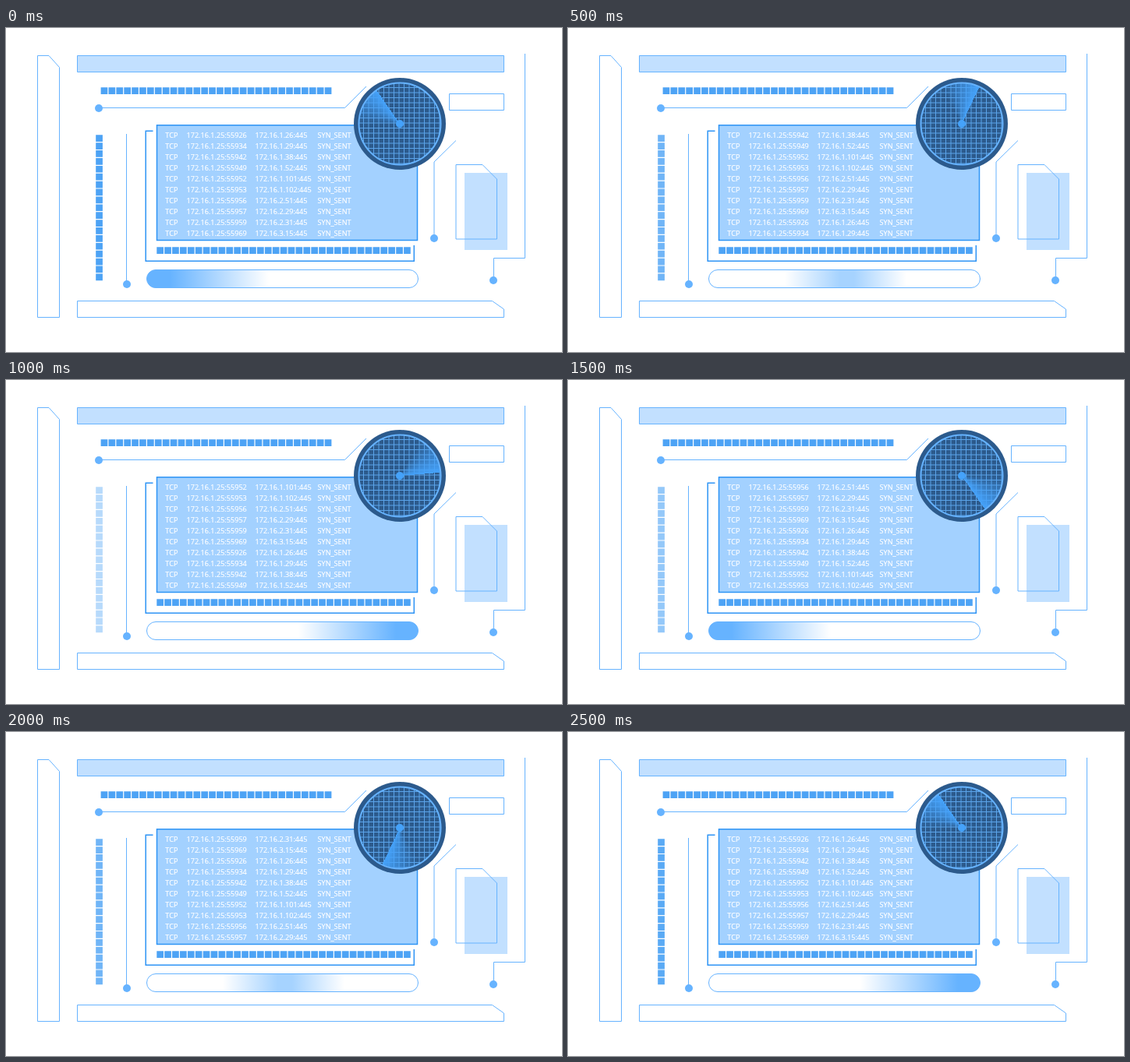
Write an HTML page that moves like this. It is 713 px wide and 416 px high and loops after 3 s.

```html
<!DOCTYPE html>
<html lang="en">
<head>
<meta charset="utf-8">
<title>Monitor panel</title>
<style>
html, body { margin: 0; width: 100%; height: 100%; overflow: hidden; background: #fff; }
svg { display: block; }
.line { fill: none; stroke: #66b3ff; }
.dots { fill: #66b3ff; }
.pale { fill: #c2e0ff; }
.squares { fill: #4da3f5; }
.edge { stroke: #2e94f5; stroke-width: 1.5; }
.beam {
  width: 104px; height: 104px; border-radius: 50%;
  background: conic-gradient(from 270deg, #45a2fa00, #45a2fa 55.4deg, #45a2fa00 0);
}
text { font: 9.1px "Open Sans", "Noto Sans", sans-serif; fill: #fff; stroke: #fff; stroke-width: .2; }
</style>
</head>
<body>
<svg width="713" height="416" viewBox="0 0 713 416">
  <defs>
    <linearGradient id="fill0" gradientUnits="userSpaceOnUse" x1="210" x2="337" y1="0" y2="0">
      <stop stop-color="#66b3ff"/><stop offset="1" stop-color="#fff"/>
    </linearGradient>
    <linearGradient id="fill1" gradientUnits="userSpaceOnUse" x1="278" x2="434" y1="0" y2="0">
      <stop stop-color="#fff"/><stop offset=".45" stop-color="#a6d3ff"/>
      <stop offset=".57" stop-color="#a6d3ff"/><stop offset="1" stop-color="#fff"/>
    </linearGradient>
    <linearGradient id="fill2" gradientUnits="userSpaceOnUse" x1="375" x2="500" y1="0" y2="0">
      <stop stop-color="#fff"/><stop offset="1" stop-color="#66b3ff"/>
    </linearGradient>
    <clipPath id="disc"><circle r="52"/></clipPath>
  </defs>

  <rect class="pale" x="588" y="186" width="55" height="99"/>
  <rect class="pale" x="91.5" y="35.5" width="547" height="21"/>
  <path class="line" d="M91.5 35.5H638.5V56.5H91.5Z
    M40.5 35.5H55L68.5 50.5V371.5H40.5Z
    M91.5 350.5H623.5L638.5 361V371.5H91.5Z
    M568.5 84.5H638.5V105.5H568.5Z
    M577 175.5H611L629.5 194V271H577Z
    M119 102.5H434.5L462 75
    M154.5 136V329
    M577 144.5L549 172V270
    M665.5 33V295.5H625.5V324"/>
  <g class="dots">
    <circle cx="119" cy="103" r="5"/>
    <circle cx="155" cy="329" r="5"/>
    <circle cx="549" cy="270" r="5"/>
    <circle cx="625" cy="324" r="5"/>
  </g>

  <g class="squares">
    <path id="top"/>
    <path id="bottom"/>
    <path id="side"/>
  </g>

  <path class="edge" fill="none" d="M188.5 132.2H179.2V299.3H523.3V279"/>
  <rect class="edge" fill="#a3d1ff" x="193.5" y="124.8" width="334" height="147.7"/>
  <g id="table"></g>
  <rect id="bar" class="line" x="180.5" y="310.5" width="348" height="23" rx="11.5"/>

  <g transform="translate(505 123)">
    <circle r="59" fill="#2c5a8c"/>
    <path id="grid" clip-path="url(#disc)" fill="none" stroke="#5ba4ea"/>
    <g id="sweep">
      <foreignObject x="-52" y="-52" width="104" height="104"><div class="beam"></div></foreignObject>
    </g>
    <circle class="line" r="52.5" stroke-width="2"/>
    <circle r="5" fill="#45a2fa"/>
  </g>
</svg>
<script>
const STEP = 500, LOOP = 3000;
const $ = id => document.getElementById(id);
const sideOpacity = [1, .8, .4, .6, .8, .92];
const connections = [
  [26, "1.26"], [34, "1.29"], [42, "1.38"], [49, "1.52"], [52, "1.101"],
  [53, "1.102"], [56, "2.51"], [57, "2.29"], [59, "2.31"], [69, "3.15"]
].map(([port, host]) => ["TCP", `172.16.1.25:559${port}`, `172.16.${host}:445`, "SYN_SENT"]);

function squares(id, x, y, count, vertical) {
  let d = "";
  for (let i = 0; i < count; i++) {
    const shift = i * 9.9;
    d += `M${vertical ? x : x + shift} ${vertical ? y + shift : y}h8.7v8.7h-8.7z`;
  }
  $(id).setAttribute("d", d);
}
squares("top", 121.6, 76.2, 30);
squares("bottom", 193.3, 281.2, 33);
squares("side", 115.2, 137.3, 19, true);

let gridPath = "";
for (let i = -8; i <= 8; i++) {
  const at = i * 6.5 - 1;
  gridPath += `M${at} -52V52M-52 ${at}H52`;
}
$("grid").setAttribute("d", gridPath);

const cells = connections.map((_, row) => [204.3, 231.5, 319.6, 399.6].map(x => {
  const cell = document.createElementNS("http://www.w3.org/2000/svg", "text");
  cell.setAttribute("x", x);
  cell.setAttribute("y", 141.3 + row * 14);
  return $("table").appendChild(cell);
}));

let shown = -1;
function draw() {
  const step = Math.floor(performance.now() % LOOP / STEP);
  if (step !== shown) {
    shown = step;
    const turn = step % 5;
    cells.forEach((line, row) => line.forEach((cell, col) => {
      cell.textContent = connections[(row + turn * 2) % 10][col];
    }));
    $("sweep").setAttribute("transform", `rotate(${turn * 60})`);
    $("side").setAttribute("opacity", sideOpacity[step]);
    $("bar").style.fill = `url(#fill${step % 3})`;
  }
  requestAnimationFrame(draw);
}
draw();
</script>
</body>
</html>
```
